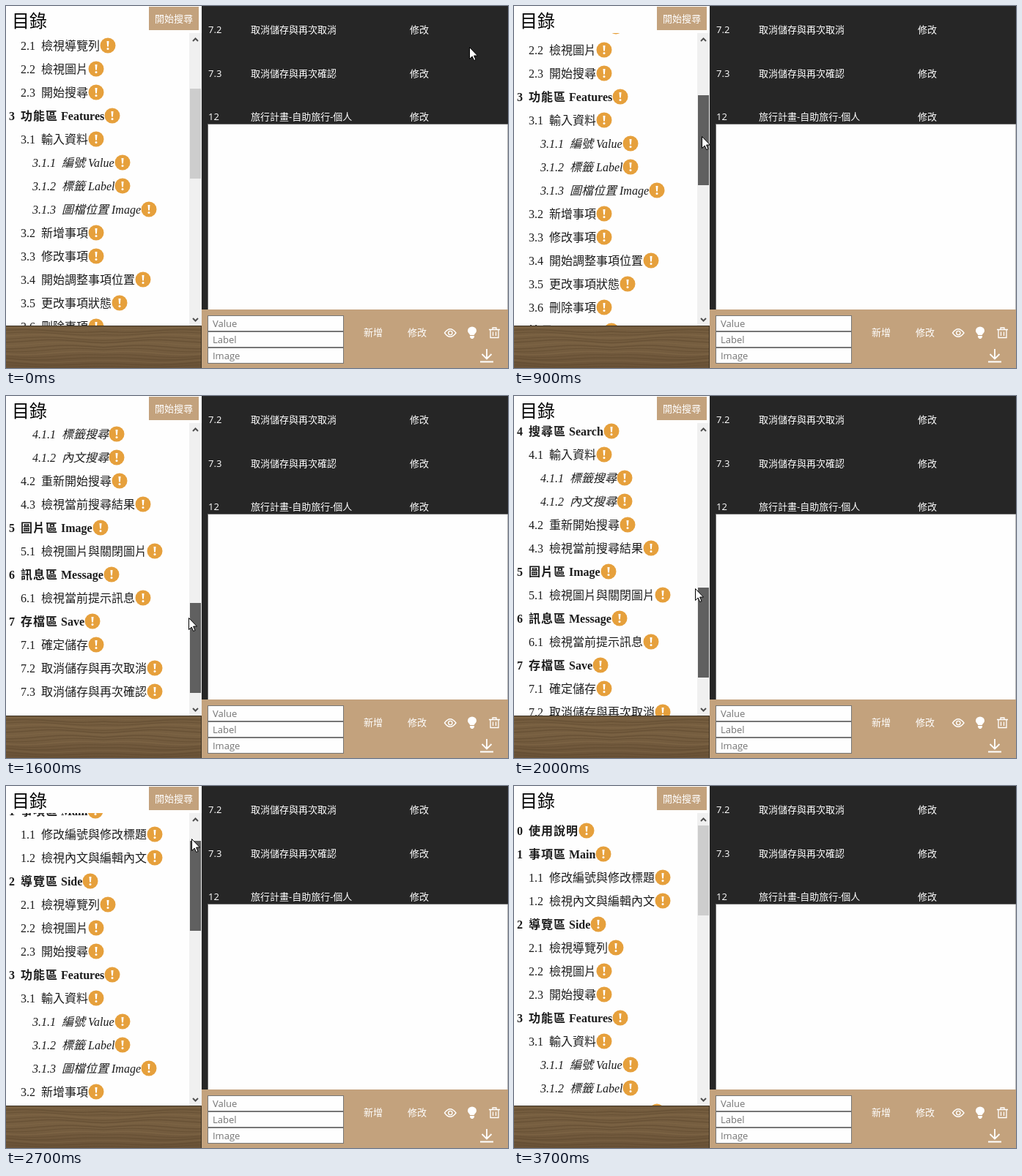
An HTML page for the animation above (4.1 s loop, 685 px wide and 495 px high).

```html
<!DOCTYPE html>
<html lang="zh-Hant">
<head>
<meta charset="utf-8">
<style>
html, body { margin: 0; width: 100%; height: 100%; overflow: hidden; }
svg { position: absolute; left: 0; top: 0; }
text { font: 13px "Open Sans", "Noto Sans CJK TC", sans-serif; }
#view { position: absolute; left: 0; top: 37px; width: 250px; height: 400px; overflow: hidden; }
#list { padding-top: 9px; }
.row { display: flex; align-items: center; height: 32px; white-space: pre; color: #1c1c1c;
  font: 16px/32px "Liberation Serif", "Noto Sans CJK TC", serif; }
.l0 { padding-left: 4px; font-weight: bold; }
.l0 span { letter-spacing: 1px; }
.l1 { padding-left: 20px; }
.l2 { padding-left: 36px; font-style: italic; }
.row svg { position: static; margin-bottom: 2px; flex: none; }
</style>
</head>
<body>
<svg width="685" height="495">
  <rect width="685" height="495" fill="#262626"/>
  <rect width="267" height="437" fill="#fefefe"/>
  <text x="8" y="29" style="font:24px 'Liberation Serif','Noto Sans CJK TC',serif">目錄</text>
  <rect x="195" y="1" width="68" height="32" fill="#c3a27d"/>

  <linearGradient id="brown" x2="0" y2="1">
    <stop stop-color="#745c3e"/><stop offset=".5" stop-color="#765e40"/><stop offset="1" stop-color="#6a5237"/>
  </linearGradient>
  <rect y="437" width="267" height="58" fill="url(#brown)"/>
  <g id="wood" fill="none"></g>
  <path d="M0 437.5H266.5V495" fill="none" stroke="#3a3022"/>

  <rect x="250" y="37" width="17" height="400" fill="#f0f0f0"/>
  <path d="M255 48l3.5-3.5 3.5 3.5M255 427l3.5 3.5 3.5-3.5" fill="none" stroke="#505050" stroke-width="2"/>
  <rect id="thumb" x="251" width="15" height="123"/>

  <path d="M275.5 415V161.5H685V415" fill="#fefefe" stroke="#707070"/>
  <rect x="267" y="415" width="418" height="80" fill="#c3a27d"/>
  <g fill="#fefefe" stroke="#767676">
    <rect x="275.5" y="423.5" width="185" height="21"/>
    <rect x="275.5" y="445.5" width="185" height="21"/>
    <rect x="275.5" y="467.5" width="185" height="21"/>
  </g>
  <g fill="#757575">
    <text x="282" y="439">Value</text><text x="282" y="461">Label</text><text x="282" y="483">Image</text>
  </g>
  <g fill="#fff">
    <text x="203" y="22">開始搜尋</text>
    <text x="276" y="37">7.2</text><text x="334" y="37">取消儲存與再次取消</text><text x="551" y="37">修改</text>
    <text x="276" y="97">7.3</text><text x="334" y="97">取消儲存與再次確認</text><text x="551" y="97">修改</text>
    <text x="276" y="156">12</text><text x="334" y="156">旅行計畫-自助旅行-個人</text><text x="551" y="156">修改</text>
    <text x="488" y="451">新增</text><text x="548" y="451">修改</text>
    <path d="M633 450c0-2-3-3-3-6a6 5.5 0 0 1 12 0c0 3-3 4-3 6zM633 451h6v2l-2 2h-2l-2-2z"/>
  </g>
  <g fill="none" stroke="#fff" stroke-width="1.3">
    <path d="M598.5 447q7.5-10.500 15.500 0q-8 10.500-15.500 0z"/>
    <circle cx="606.300" cy="447" r="2.700"/>
    <path d="M659 442.500h15M664 442v-2h5v2M661 443v10.500h11V443M664.500 445.500v5.500M668.500 445.500v5.500"/>
    <path d="M656 469v13M649.500 476l6.500 6.500 6.500-6.500M647 486.500h18" stroke-width="1.800"/>
  </g>
</svg>

<div id="view"><div id="list"></div></div>

<svg width="685" height="495">
  <path id="cursor" d="M.5.5V16.500L4.200 13 6.700 18.500 9 17.500 6.600 12H11.500Z" fill="#fff" stroke="#000"/>
</svg>

<script>
const $ = id => document.getElementById(id);

const items = `0 使用說明
1 事項區 Main
1.1 修改編號與修改標題
1.2 檢視內文與編輯內文
2 導覽區 Side
2.1 檢視導覽列
2.2 檢視圖片
2.3 開始搜尋
3 功能區 Features
3.1 輸入資料
3.1.1 編號 Value
3.1.2 標籤 Label
3.1.3 圖檔位置 Image
3.2 新增事項
3.3 修改事項
3.4 開始調整事項位置
3.5 更改事項狀態
3.6 刪除事項
4 搜尋區 Search
4.1 輸入資料
4.1.1 標籤搜尋
4.1.2 內文搜尋
4.2 重新開始搜尋
4.3 檢視當前搜尋結果
5 圖片區 Image
5.1 檢視圖片與關閉圖片
6 訊息區 Message
6.1 檢視當前提示訊息
7 存檔區 Save
7.1 確定儲存
7.2 取消儲存與再次取消
7.3 取消儲存與再次確認`.split('\n');

const badge = `<svg width="22" height="22"><circle cx="11" cy="11" r="10.5" fill="#e6a03c"/>
<path d="M9.500 5h3l-.6 7.500h-1.800z" fill="#fff"/><circle cx="11" cy="15.500" r="1.500" fill="#fff"/></svg>`;

$('list').innerHTML = items.map(item => {
  const [num, ...words] = item.split(' ');
  const label = words.join(' ').replace(/[^\x00-\x7f]+/, '<span>$&</span>');
  return `<div class="row l${num.split('.').length - 1}"><div>${num}  ${label}</div>${badge}</div>`;
}).join('');

// Wood grain, mirrored around the middle of the panel
for (let i = 0; i < 15; i++) {
  let d = '';
  for (let x = 0; x <= 266; x += 7) {
    const u = Math.abs(x - 133);
    const y = 440 + i * 3.8 + 1.5 * Math.sin(u / 23 + i * .35) + Math.sin(u / 47 + i * .6);
    d += `${d ? 'L' : 'M'}${x} ${y.toFixed(1)}`;
  }
  $('wood').innerHTML += `<path d="${d}" stroke="${i % 3 ? '#604a30' : '#826949'}" stroke-width="${1 + i % 2 * .5}" opacity=".6"/>`;
}

// Pointer path: time, x, y
const path = [
  [0, 632, 56], [100, 610, 60], [300, 420, 100], [500, 275, 128], [600, 257, 131], [700, 257, 131],
  [800, 257, 140], [900, 256, 178], [1000, 254, 235], [1100, 252, 275], [1200, 251, 288], [1300, 250, 296],
  [1600, 249, 303], [1700, 249, 303], [1800, 249, 297], [1900, 248, 280], [2000, 247, 263],
  [2300, 250, 145], [2400, 251, 134], [2700, 253, 72], [2900, 254, 68], [3100, 254, 54], [3200, 254, 54],
  [3300, 270, 52], [3400, 370, 46], [3600, 672, 28], [4100, 672, 28]
];

function pointer(t) {
  const i = path.findIndex(p => p[0] > t);
  const [a, b] = [path[i - 1], path[i]];
  const k = (t - a[0]) / (b[0] - a[0]);
  return [1, 2].map(n => Math.round(a[n] + (b[n] - a[n]) * k));
}

function draw(now) {
  const t = Math.floor(now % 4100 / 100) * 100;
  const [x, y] = pointer(t);
  const dragging = t >= 800 && t < 3300;
  // The thumb trails the pointer by one step
  const top = t < 800 ? 113 : Math.max(54, pointer(t - 100)[1] - 18);
  $('thumb').setAttribute('y', top);
  $('thumb').setAttribute('fill', dragging ? '#606060' : x < 267 ? '#a6a6a6' : '#cdcdcd');
  $('list').style.transform = `translateY(${-Math.round((top - 54) * 2.833)}px)`;
  $('cursor').setAttribute('transform', `translate(${x} ${y})`);
  $('cursor').setAttribute('visibility', t < 3700 ? 'visible' : 'hidden');
  requestAnimationFrame(() => draw(performance.now()));
}
draw(0);
</script>
</body>
</html>
```
